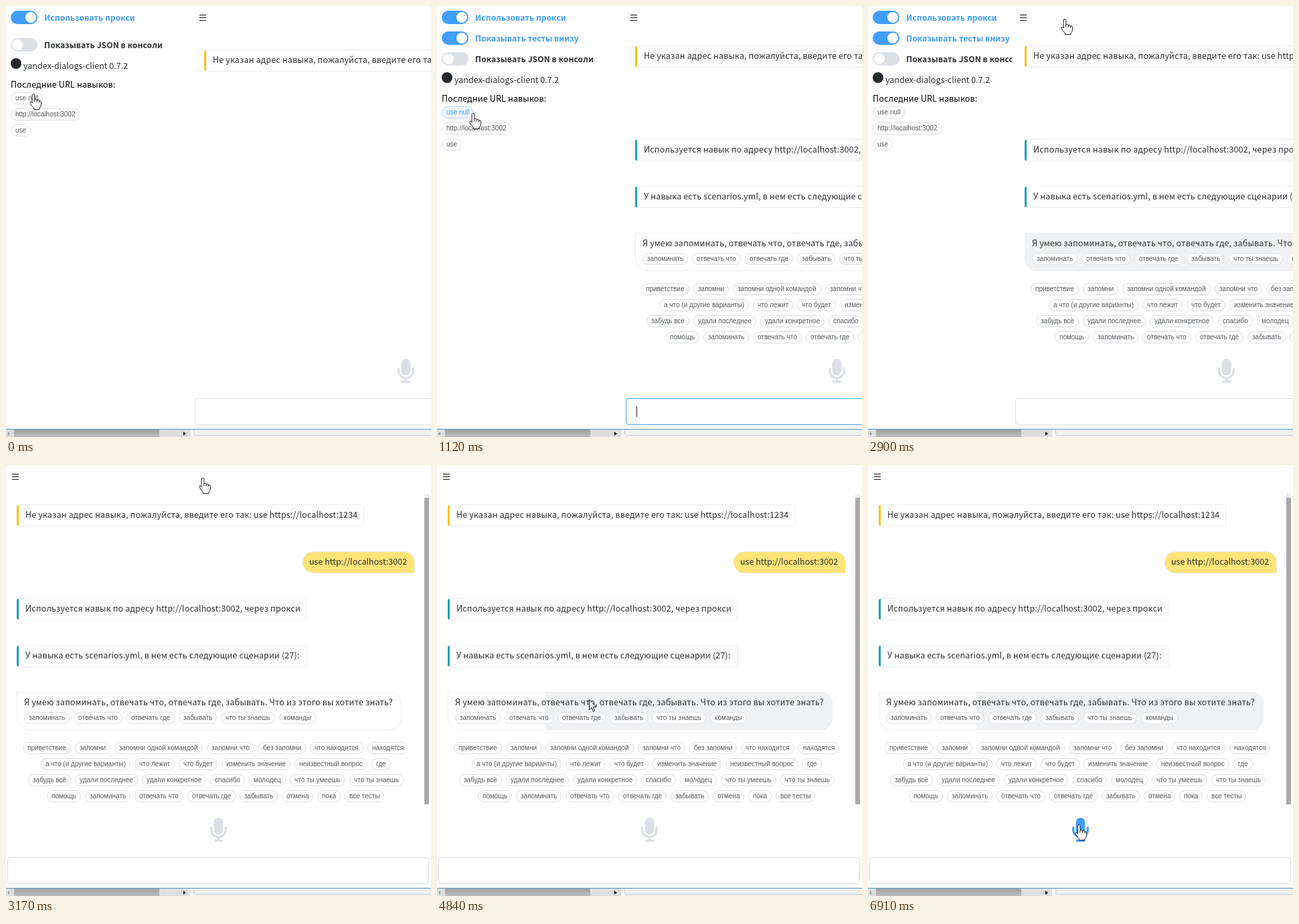
An HTML page that plays this animation: 635 by 644 pixels, repeating every 8000 ms.

```html
<!DOCTYPE html>
<html lang="ru">
<head>
<meta charset="utf-8">
<title>Dialog client</title>
<style>
  html, body { margin: 0; width: 100%; height: 100%; overflow: hidden; background: #fefefe; }
  svg { display: block; }
  text { font: 12.54px "Noto Sans CJK JP", "Noto Sans CJK SC", "Noto Sans CJK", "Open Sans", sans-serif; letter-spacing: .125px; fill: #2c2f33; white-space: pre; }
  .latin { letter-spacing: 0; }
  .label { font-weight: 600; font-size: 12.2px; letter-spacing: .03px; }
  .on { fill: #409eff; }
  .title { fill: #000; }
  .chip rect { fill: #fff; stroke: #dcdfe6; }
  .chip text { font: 10px "Liberation Sans", Arial, sans-serif; letter-spacing: 0; fill: #55585e; }
  .hot rect { fill: #ecf5ff; stroke: #b3d8ff; }
  .hot text { fill: #409eff; }
  .line { fill: none; stroke: #ebeef5; }
  .cursor { fill: #fff; stroke: #111; stroke-linejoin: round; }
</style>
</head>
<body>
<svg width="635" height="644" viewBox="0 0 635 644">
  <defs>
    <clipPath id="sideClip"><rect id="sideEdge" height="644"/></clipPath>
    <clipPath id="bubbleClip"><path d="M16 339H573a18 18 0 0 1 18 18V378a18 18 0 0 1-18 18H36a20 20 0 0 1-20-20z"/></clipPath>
    <linearGradient id="thumb" x2="0" y2="1"><stop stop-color="#a0a0a0"/><stop offset="1" stop-color="#bdbdbd"/></linearGradient>
  </defs>

  <g clip-path="url(#sideClip)">
    <g id="side"></g>
    <g id="tests"></g>
    <g id="lower"><circle cx="15" cy="107" r="8" fill="#24292e"/></g>
  </g>

  <g id="main">
    <path d="M9 13.5h10M9 17.5h10M9 21.5h10" stroke="#111"/>
    <g id="notice"></g>
    <g id="reply">
      <path d="M459 129.500H595a15.500 15.500 0 0 1 15.500 15.500V161.500H459a16 16 0 0 1 0-32z" fill="#ffe478" stroke="#ebeef5"/>
      <rect id="shade" y="339" width="600" height="57" fill="#f0f1f3" clip-path="url(#bubbleClip)"/>
      <path class="line" d="M16.5 339.5H573a17.5 17.5 0 0 1 17.5 17.5V378a17.5 17.5 0 0 1-17.5 17.5H36a19.5 19.5 0 0 1-19.5-19.5z"/>
    </g>
    <rect id="track" y="43" height="6" fill="#ededed"/>
    <rect id="bar" y="49" height="458" fill="#a8a8a8"/>
    <g id="mic" stroke-linecap="round">
      <rect x="-6.8" y="-18" width="13.6" height="25" rx="6.8" stroke="none"/>
      <path d="M-10.8-3V0a10.8 10.8 0 0 0 21.6 0V-3M0 11V16M-5.2 16.4H5.2" fill="none" stroke-width="3.3"/>
    </g>
    <rect id="input" x="2.5" y="586.5" width="629" height="39" rx="4" fill="#fff"/>
    <path id="caret" d="M18.5 598V614" stroke="#222"/>
  </g>

  <rect y="631" width="635" height="13" fill="#f1f1f1"/>
  <rect y="633" width="275" height="11" fill="#dedede"/>
  <rect y="632" width="635" height="1" fill="#5f9ab8"/>
  <rect x="12" y="633" width="217" height="11" fill="url(#thumb)"/>
  <path d="M5 636v6l-3-3z" fill="#999"/>
  <path d="M265 636v6l4-3z" fill="#111"/>
  <rect x="275" y="633" width="5" height="11" fill="#fafafa"/>
  <path d="M280.5 633V639q0 2.500 3 2.500H635" fill="none" stroke="#c8c8c8"/>

  <g id="hand" class="cursor">
    <g transform="translate(-1 0) scale(.95)">
      <path d="M-2 1.500a2 2 0 0 1 4 0V8q3-1 3.600 1q3-.8 3.400 1.200q3-.5 3 2v4.500q0 2.500-2.500 5v2h-9v-2q-3-3-5.500-7.500q-.8-2.500 1-2.600q1.200 0 2 2.200z"/>
      <path d="M2 8v4M5.600 9v3.500M9 10.200v3" fill="none"/>
    </g>
  </g>
  <path id="arrow" class="cursor" d="M.5.500V16L4 12.600L6.400 18.300L8.600 17.300L6.200 11.600H11z"/>
</svg>
<script>
const $ = id => document.getElementById(id);

function add(parent, tag, attrs, content = '') {
  const node = document.createElementNS('http://www.w3.org/2000/svg', tag);
  for (const key in attrs) node.setAttribute(key, attrs[key]);
  node.textContent = content;
  return parent.appendChild(node);
}
const set = (id, attrs) => { for (const key in attrs) $(id).setAttribute(key, attrs[key]); };
const show = (id, visible) => set(id, { visibility: visible ? 'visible' : 'hidden' });
const move = (id, x, y) => set(id, { transform: `translate(${x} ${y})` });

function toggle(parent, y, on, caption) {
  add(parent, 'rect', { x: 7, y: y - 10, width: 40, height: 20, rx: 10, fill: on ? '#409eff' : '#dcdfe6' });
  add(parent, 'circle', { cx: on ? 37 : 17, cy: y, r: 8, fill: '#fff' });
  add(parent, 'text', { x: 57, y: y + 5, class: on ? 'label on' : 'label' }, caption);
}

function chip(parent, x, y, caption) {
  const group = add(parent, 'g', { class: 'chip' });
  const box = add(group, 'rect', { x: x + .5, y: y + .5, height: 17, rx: 8.5 });
  const width = Math.round(add(group, 'text', { x: x + 7, y: y + 12 }, caption).getComputedTextLength()) + 14;
  box.setAttribute('width', width - 1);
  return { group, width };
}

// Lays chips out from the left edge; returns the width of the row.
function chipRow(parent, x, y, captions) {
  let right = x;
  for (const caption of captions.split('|')) right += chip(parent, right, y, caption).width + 6;
  return right - 6 - x;
}

function centredRow(parent, y, captions) {
  const row = add(parent, 'g', {});
  const width = chipRow(row, 0, y, captions);
  row.setAttribute('transform', `translate(${Math.floor(313.5 - width / 2)} 0)`);
}

function message(parent, y, width, colour, caption) {
  add(parent, 'rect', { x: 16.5, y: y + .5, width: width - 1, height: 32, rx: 3, class: 'line' });
  add(parent, 'path', { d: `M19 ${y + 1}v31q-3 0-3-3v-25q0-3 3-3z`, fill: colour });
  add(parent, 'text', { x: 29, y: y + 20 }, caption);
}

toggle($('side'), 17, true, 'Использовать прокси');
toggle($('tests'), 48, true, 'Показывать тесты внизу');
const lower = $('lower'), reply = $('reply');
toggle(lower, 79, false, 'Показывать JSON в консоли');
add(lower, 'text', { x: 26, y: 115, class: 'latin' }, 'yandex-dialogs-client 0.7.2');
add(lower, 'text', { x: 7, y: 143, class: 'title' }, 'Последние URL навыков:');
const nullChip = chip(lower, 7, 150, 'use null').group;
const hostChip = chip(lower, 7, 174, 'http://localhost:3002').group;
chip(lower, 7, 198, 'use');

message($('notice'), 59, 519, '#ffc107', 'Не указан адрес навыка, пожалуйста, введите его так: use https://localhost:1234');
add(reply, 'text', { x: 453, y: 149, class: 'latin' }, 'use http://localhost:3002');
message(reply, 199, 433, '#17a2b8', 'Используется навык по адресу http://localhost:3002, через прокси');
message(reply, 269, 434, '#17a2b8', 'У навыка есть scenarios.yml, в нем есть следующие сценарии (27):');
add(reply, 'text', { x: 27, y: 359 }, 'Я умею запоминать, отвечать что, отвечать где, забывать. Что из этого вы хотите знать?');
chipRow(reply, 27, 369, 'запоминать|отвечать что|отвечать где|забывать|что ты знаешь|команды');
[
  'приветствие|запомни|запомни одной командой|запомни что|без запомни|что находится|находятся',
  'а что (и другие варианты)|что лежит|что будет|изменить значение|неизвестный вопрос|где',
  'забудь всё|удали последнее|удали конкретное|спасибо|молодец|что ты умеешь|что ты знаешь',
  'помощь|запоминать|отвечать что|отвечать где|забывать|отмена|пока|все тесты'
].forEach((captions, i) => centredRow(reply, 414 + 24 * i, captions));

// The screen refreshes in bursts: first time, last time, count.
const ticks = [0];
for (const [from, to, count] of [
  [150, 1120, 7], [1240, 2210, 7], [2360, 2630, 3], [2900, 3170, 3], [3320, 3840, 4],
  [3990, 4140, 2], [4450, 5480, 8], [5600, 5600, 1], [6000, 6000, 1], [6280, 6910, 6]
]) for (let i = 0; i < count; i++) ticks.push(from + (to - from) * i / Math.max(1, count - 1));

// Pointer path: time, x, y.
const path = [
  [0, 42, 132], [473, 55, 161], [1120, 55, 161], [2210, 271, 19], [2630, 295, 20], [3170, 295, 20],
  [3840, 241, 180], [3990, 202, 253], [4140, 196, 261], [4450, 192, 275], [5480, 316, 538], [8000, 316, 538]
];
const smooth = p => { p = Math.min(1, Math.max(0, p)); return p * p * (3 - 2 * p); };
const between = (t, from, to) => t >= from && t < to;

function pointer(t) {
  const i = path.findIndex(point => point[0] > t);
  const [t0, x0, y0] = path[i - 1], [t1, x1, y1] = path[i];
  const p = (t - t0) / (t1 - t0);
  return [Math.round(x0 + (x1 - x0) * p), Math.round(y0 + (y1 - y0) * p)];
}

function draw(time) {
  const t = ticks.filter(tick => tick <= time + .5).pop();
  const loaded = t >= 790;
  const focused = between(t, 790, 2900);
  const shift = Math.round(280 * (1 - smooth((t - 2809) / 300)));

  set('sideEdge', { width: Math.max(0, shift - 3) });
  move('lower', 0, loaded ? 0 : -21);
  show('tests', loaded);
  nullChip.classList.toggle('hot', between(t, 950, 1400));
  hostChip.classList.toggle('hot', between(t, 470, 790));

  move('main', shift, 0);
  move('notice', 0, loaded ? 0 : 6);
  show('reply', loaded);
  set('shade', { x: between(t, 2900, 3000) ? 16 : t < 3600 ? 600 : t < 4450 ? 290 : 162 });
  const wide = between(t, 3600, 4450);
  for (const id of ['track', 'bar']) set(id, { x: wide ? 618 : 625, width: wide ? 14 : 7 });
  set('input', { stroke: focused ? '#409eff' : '#dcdfe6' });
  show('caret', focused && Math.floor((t - 790) / 530) % 2 === 0);

  const pulse = between(t, 6280, 6910) ? Math.sin(Math.PI * (t - 6154) / 756) : 0;
  const colour = t < 5600 ? '#dcdfe6' : between(t, 6000, 6280) ? '#3a8ee6' : '#409eff';
  set('mic', { fill: colour, stroke: colour, transform: `translate(317.5 545) scale(${1 + .45 * pulse})` });

  const pointing = t < 1240 || between(t, 2480, 3320) || t >= 5400;
  show('hand', pointing);
  show('arrow', !pointing);
  move(pointing ? 'hand' : 'arrow', ...pointer(t));
}

function frame() {
  draw(performance.now() % 8000);
  requestAnimationFrame(frame);
}
frame();
</script>
</body>
</html>
```
